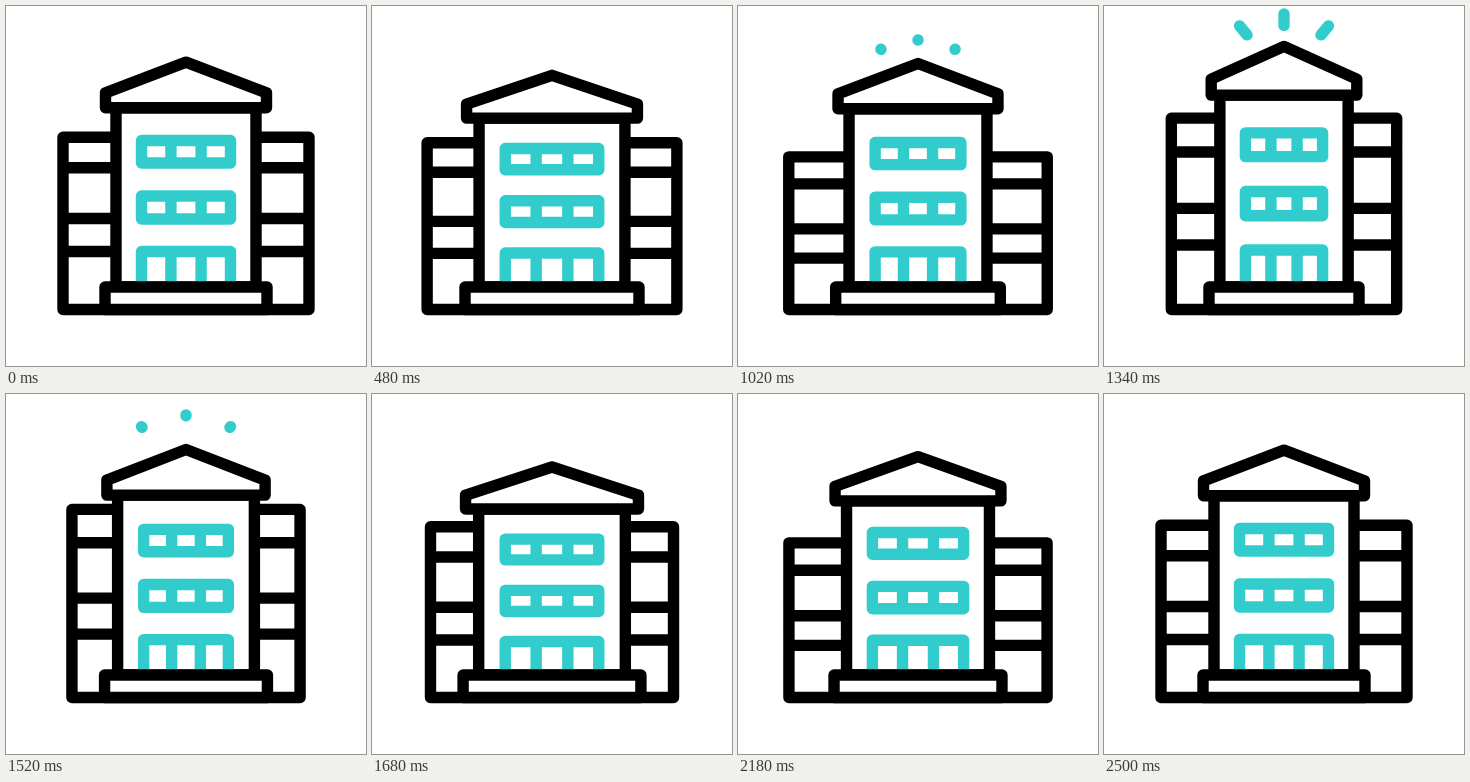
Write an HTML page that moves like this. It is 360 px wide and 360 px high and loops after 3 s.

```html
<!DOCTYPE html>
<html lang="en">
<head>
<meta charset="utf-8">
<title>Bouncing building</title>
<style>
  html, body { margin: 0; height: 100%; overflow: hidden; background: #fff; }
  svg { display: block; width: 100%; height: 100%; }
  path { fill: #fff; stroke: #000; stroke-width: 11.4; stroke-linejoin: round; stroke-linecap: round; }
  .accent { fill: none; stroke: #3cc; }
</style>
</head>
<body>
<svg viewBox="0 0 360 360">
  <path id="wings"/>
  <path id="body"/>
  <path id="windows" class="accent"/>
  <path id="roof"/>
  <path id="base"/>
  <path id="rays" class="accent"/>
</svg>
<script>
const LOOP = 3000, MID = 180, GROUND = 303.5, STEP = 281;
const MAIN_KEYS = [220, 720, 1280, 1840, 2360];
const WING_KEYS = [300, 900, 1400, 1980, 2500];

const ease = (t, from, to) => {
  const k = Math.min(1, Math.max(0, (t - from) / (to - from)));
  return (1 - Math.cos(Math.PI * k)) / 2;
};

// Rest, squash, stretch, squash, rest
function bounce(t, keys, squash, stretch) {
  const values = [0, squash, stretch, squash, 0];
  let value = 0;
  for (let i = 1; i < keys.length; i++) {
    value += (values[i] - values[i - 1]) * ease(t, keys[i - 1], keys[i]);
  }
  return value;
}

const line = (x1, y1, x2, y2) => `M${x1} ${y1}L${x2} ${y2}`;
const box = (half, top, bottom) =>
  `M${MID - half} ${top}H${MID + half}V${bottom}H${MID - half}Z`;
const setPath = (id, d) => document.getElementById(id).setAttribute('d', d);

function drawWings(t) {
  const half = 123 + bounce(t, WING_KEYS, 9, -11);
  const scale = 1 - bounce(t, WING_KEYS, 26, -20.7) / 172;
  const y = v => GROUND + (v - GROUND) * scale;
  const floors = [161.8, 212.5, 245.5].map(v => line(MID - half, y(v), MID + half, y(v)));
  setPath('wings', box(half, y(131.3), GROUND) + floors.join(''));
}

function drawWindows(t) {
  const half = 44.5 + bounce(t, MAIN_KEYS, 4.2, -6.2);
  const scale = 1 - bounce(t, MAIN_KEYS, 24.5, -13.5) / 225;
  const y = v => 272 + (v - 272) * scale;
  const row = (top, bottom) => box(half, top, bottom) +
    [-1, 1].map(s => line(MID + s * half / 2.95, top, MID + s * half / 2.95, bottom)).join('');
  setPath('windows', row(y(134.5), y(157)) + row(y(190), y(213)) + row(y(245.5), STEP));
}

function drawRays(t, lift) {
  if (t < 1000 || t > 1560) return setPath('rays', '');
  const head = ease(t, 1000, 1260), tail = ease(t, 1340, 1560);
  const ray = (x, y, dx, dy) =>
    line(x + dx * tail, y + lift + dy * tail, x + dx * head + 0.01, y + lift + dy * head);
  setPath('rays', ray(143, 42.3, -7.5, -9) + ray(MID, 33, 0, -11.5) + ray(217, 42.3, 7.5, -9));
}

function draw(t) {
  const drop = bounce(t, MAIN_KEYS, 24.5, -17);
  const widen = bounce(t, MAIN_KEYS, 5.5, -6.2);
  const eave = 80.5 + bounce(t, MAIN_KEYS, 9.2, -8.2);
  const scale = 1 - drop / 225;
  const y = v => STEP + (v - STEP) * scale;

  drawWings(t);
  setPath('body', box(70 + widen, y(101.7), STEP));
  drawWindows(t);
  setPath('roof', `M${MID} ${y(56.2)}L${MID + eave} ${y(86.8)}V${y(101.7)}H${MID - eave}V${y(86.8)}Z`);
  setPath('base', box(81 + bounce(t, MAIN_KEYS, 11.2, -6.5), STEP, GROUND));
  drawRays(t, drop * 0.85);
}

function tick() {
  draw(performance.now() % LOOP);
  requestAnimationFrame(tick);
}
tick();
</script>
</body>
</html>
```
